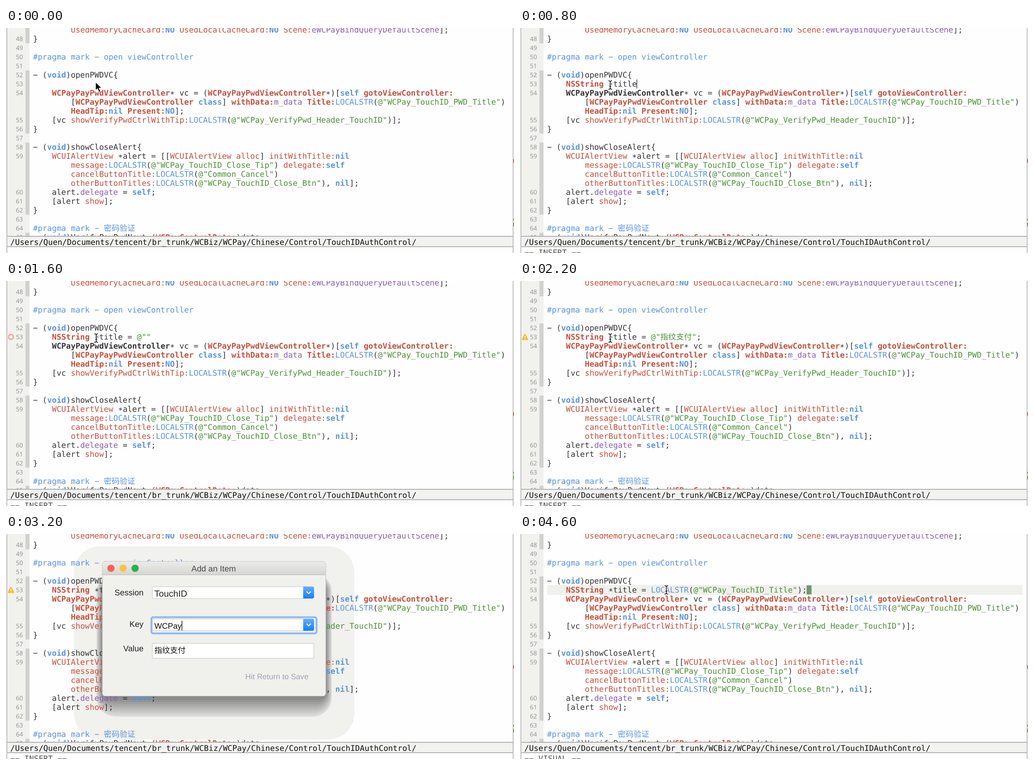
These frames come from a looping animation (1123 px wide and 499 px high, 4.8 s). An HTML page:

```html
<!DOCTYPE html>
<html lang="en">
<head>
<meta charset="utf-8">
<title>Editor with string dialog</title>
<style>
  html, body { margin: 0; width: 100%; height: 100%; overflow: hidden; background: #fefefe; }
  svg { display: block; width: 1123px; height: 499px; }
  text { white-space: pre; text-rendering: geometricPrecision; }
  .code { font: 17.35px "DejaVu Sans Mono", "Noto Sans CJK SC", "Noto Sans CJK", monospace; }
  .num { font: 13.6px "Open Sans", sans-serif; fill: #8e8e8e; text-anchor: end; }
  .ui { font-family: "Liberation Sans", "Noto Sans CJK SC", "Noto Sans CJK", sans-serif; }
  .k, .K { fill: #35353a; }
  .r, .R { fill: #c1513f; }
  .b, .B { fill: #5b94d8; }
  .g { fill: #4c9138; }
  .p { fill: #8a5fae; }
  .K, .R, .B { font-weight: bold; }
  .star { baseline-shift: -3px; }
</style>
</head>
<body>
<svg id="stage" viewBox="0 0 1123 499">
  <defs>
    <clipPath id="pane"><rect x="0" y="0" width="1120" height="461"/></clipPath>
    <linearGradient id="bar" x2="0" y2="1"><stop stop-color="#ebebe9"/><stop offset="1" stop-color="#d6d6d5"/></linearGradient>
    <linearGradient id="blue" x2="0" y2="1"><stop stop-color="#62b1f8"/><stop offset="1" stop-color="#1a7df3"/></linearGradient>
  </defs>
  <rect width="1123" height="499" fill="#fefefe"/>
  <g clip-path="url(#pane)">
    <rect x="3" width="49" height="461" fill="#f1f1ee"/>
    <g id="folds" fill="#d1d1d0"></g>
    <g id="shadow"></g>
    <rect id="rowLight" x="60" y="113" width="1051" height="22" fill="#f0f1ec"/>
    <g id="code"></g>
    <g id="edited"></g>
    <g id="declared"></g>
  </g>
  <rect id="caret" y="114" width="1.4" height="20" fill="#333"/>
  <rect id="block" x="633.5" y="114" width="11" height="20" fill="#6e976f"/>
  <circle id="error" cx="11" cy="124" r="5.2" fill="#fff" stroke="#eeaaa2" stroke-width="3.4"/>
  <g id="warning">
    <path d="M11 118 17 130H5Z" fill="#f5b92f" stroke="#f5b92f" stroke-width="2" stroke-linejoin="round"/>
    <path d="M11 121.5v4.5m0 1.6v1.8" stroke="#fff" stroke-width="1.8"/>
  </g>
  <rect x="3" y="462" width="1117" height="23" fill="#f2f2f0"/>
  <path d="M3 462H1121M3 485H1121" stroke="#9a9a9a" stroke-width="1.6"/>
  <path d="M2 0V499M1121 0V499" stroke="#b2b2b4" stroke-width="1.6"/>
  <path d="M1122 291v8" stroke="#d9695c" stroke-width="2"/>
  <path d="M1122 423v4m0 5v8" stroke="#78a957" stroke-width="2"/>
  <text class="code" x="9.5" y="480.5" fill="#111">/Users/Quen/Documents/tencent/br_trunk/WCBiz/WCPay/Chinese/Control/TouchIDAuthControl/</text>
  <text id="mode" class="code" x="9.5" y="504" fill="#555"></text>
  <g id="dialog" class="ui"></g>
  <path id="arrow" d="M198 120v18.5l4.3-4 3.4 7.8 3.4-1.5-3.4-7.5h6Z" fill="#000" stroke="#fff" stroke-width="1.2"/>
  <g id="beam" fill="none">
    <path d="M-4-9.5q4 0 4 3 0-3 4-3M0-6.5V6.5M-4 9.5q4 0 4-3 0 3 4 3M-2 3H2" stroke="#fff" stroke-width="3.5"/>
    <path d="M-4-9.5q4 0 4 3 0-3 4-3M0-6.5V6.5M-4 9.5q4 0 4-3 0 3 4 3M-2 3H2" stroke="#111" stroke-width="1.6"/>
  </g>
  <path id="cross" d="M198.5 115v17M190 124.5h17" stroke="#333" stroke-width="1.5"/>
</svg>
<script>
const LOOP = 4800, STEP = 200, COL = 10.445, LEFT = 59.7;
const $ = id => document.getElementById(id);
const show = (id, on) => $(id).setAttribute('display', on ? 'inline' : 'none');

// A backtick and a style letter open each coloured run.
function runs(line) {
  return line.split('`').slice(1).map(run => {
    const body = run.slice(1).replace(/\*/g, '<tspan class="star">*</tspan>');
    return `<tspan class="${run[0]}">${body}</tspan>`;
  }).join('');
}
const codeLine = (row, col, line) =>
  `<text class="code" x="${LEFT + col * COL}" y="${10 + row * 20}">${runs(line)}</text>`;

const lines = [
  [0, 8, '`rUsedMemoryCacheCard:`BNO`r UsedLocalCacheCard:`BNO`r Scene:`peWCPayBindQueryDefaultScene`k];'],
  [1, 0, '`k}'],
  [3, 0, '`b#pragma mark − open viewController'],
  [5, 0, '`k− (`Bvoid`k)openPWDVC{'],
  [8, 8, '`k[`RWCPayPayPwdViewController `Bclass`k] `RwithData:`pm_data`R Title:`bLOCALSTR`k(`g@"WCPay_TouchID_PWD_Title"`k)'],
  [9, 8, '`RHeadTip:`Bnil`R Present:`BNO`k];'],
  [10, 4, '`k[vc `rshowVerifyPwdCtrlWithTip:`bLOCALSTR`k(`g@"WCPay_VerifyPwd_Header_TouchID"`k)];'],
  [11, 0, '`k}'],
  [13, 0, '`k− (`Bvoid`k)showCloseAlert{'],
  [14, 4, '`rWCUIAlertView`k *alert = [[`rWCUIAlertView alloc`k] `rinitWithTitle:`Bnil'],
  [15, 8, '`rmessage:`bLOCALSTR`k(`g@"WCPay_TouchID_Close_Tip"`k) `rdelegate:`Bself'],
  [16, 8, '`rcancelButtonTitle:`bLOCALSTR`k(`g@"Common_Cancel"`k)'],
  [17, 8, '`rotherButtonTitles:`bLOCALSTR`k(`g@"WCPay_TouchID_Close_Btn"`k), `Bnil`k];'],
  [18, 4, '`kalert.`pdelegate`k = `Bself`k;'],
  [19, 4, '`k[alert `rshow`k];'],
  [20, 0, '`k}'],
  [22, 0, '`b#pragma mark − 密码验证'],
  [23, 0, '`k− (`Bvoid`k)VerifyPayPwdNext:(`RWCPayControlData`k*)data']
];

// Wrapped lines leave rows without a number.
const numberRow = n => n - 47 + (n > 54 ? 2 : 0) + (n > 59 ? 3 : 0);
let numbers = '';
for (let n = 48; n <= 65; n++) {
  numbers += `<text class="num" x="37.5" y="${9 + numberRow(n) * 20}">${n}</text>`;
}
$('code').innerHTML = numbers + lines.map(args => codeLine(...args)).join('');
$('folds').innerHTML = [[0, 34], [94, 234], [254, 414], [454, 461]]
  .map(([top, end]) => `<rect x="43" y="${top}" width="9" height="${end - top}"/>`).join('');

const box = (x, y, right, bottom, r, fill, more = '') =>
  `<rect x="${x}" y="${y}" width="${right - x}" height="${bottom - y}" rx="${r}" fill="${fill}" ${more}/>`;
const label = (x, y, size, fill, text, anchor = 'start') =>
  `<text x="${x}" y="${y}" font-size="${size}" fill="${fill}" text-anchor="${anchor}">${text}</text>`;

function shadow(active) {
  if (!active) {
    return box(165, 27, 753, 416, 46, '#f1f1ed') + box(214, 300, 706, 370, 26, '#d2d2d0');
  }
  let out = box(150, 27, 770, 456, 58, '#f1f1ed');
  const bands = 9;
  for (let i = 0; i < bands; i++) {
    const grey = 219 - i * 10;
    const side = 13 - i * 1.5;
    out += box(213 - side, 86 + i * 3, 707 + side, 405 - i * 4.6, 42 - i * 3, `rgb(${grey},${grey},${grey - 1})`);
  }
  return out;
}

function combo(y, active) {
  const border = 'stroke="#c5c5c5"';
  const button = active
    ? box(657, y, 681, y + 26.5, 4, 'url(#blue)') + box(657, y, 662, y + 26.5, 0, 'url(#blue)')
    : box(654, y + .5, 680.5, y + 26.5, 4, '#fff', border);
  return box(323.5, y + .5, 674, y + 26.5, 0, '#fff', border) + button +
    `<path d="M664.5 ${y + 11}l4.7 4.6 4.7-4.6" fill="none" stroke="${active ? '#fff' : '#333'}" stroke-width="2"/>`;
}

function dialog(active, key, caretOn) {
  const lights = active ? ['#fb6158', '#fdc43d', '#29b24b'] : ['#e6e6e4', '#e6e6e4', '#e6e6e4'];
  let out = box(213, 61, 707, 359.5, 6, '#f0f0ed', 'stroke="#b8b8b7"') +
    `<path d="M213.5 90V67q0-5.5 5.5-5.5H701q5.5 0 5.5 5.5V90Z" fill="${active ? 'url(#bar)' : '#fafafa'}"/>` +
    `<path d="M213 90.5H707" stroke="${active ? '#b9b9b8' : '#d8d8d7'}"/>`;
  lights.forEach((fill, i) => {
    out += `<circle cx="${232 + i * 26.7}" cy="76" r="8" fill="${fill}"/>`;
  });
  out += label(459, 83, 18.3, active ? '#4a4a4a' : '#b2b2b2', active ? 'Add an Item' : 'Window', 'middle');
  [['Session', 136], ['Key', 206], ['Value', 260]].forEach(([text, y]) => {
    out += label(304, y, 18, '#222', text, 'end');
  });
  if (active) out += box(321.5, 184.5, 686.5, 220.5, 4, '#f0f0ed', 'stroke="#8bbbf0" stroke-width="4"');
  out += combo(116.5, active) + combo(188, active) +
    box(323.5, 242.5, 680.5, 275.5, 0, '#fff', 'stroke="#c2c2c2"') +
    label(529, 322, 17.1, '#a2a2b8', 'Hit Return to Save');
  if (active) {
    out += label(328, 139, 19.8, '#222', 'TouchID') + label(328, 264, 17.3, '#111', '指纹支付') +
      `<text id="key" x="328" y="210" font-size="17.8" fill="#111">${key}</text>`;
    if (caretOn) out += '<rect id="keyCaret" y="192" width="1.4" height="22" fill="#111"/>';
  }
  return out;
}

const declaration = '`RNSString`k *title';
const typed = [
  '`k', '`k', '`kNSStr', '`RNSString`k *', declaration, declaration + ' =', declaration + ' = `g@',
  declaration + ' = `g@""', declaration + ' = `g@""', declaration + ' = `g@"指纹支付"',
  declaration + ' = `g@"指纹支付"`k;'
];
const saved = declaration + ' = `bLOCALSTR`k(`g@"WCPay_TouchID_Title"`k);';
const keys = ['', 'WC', 'WCPay', 'WCPay_TouchID', 'WCPay_TouchID_Title', 'WCPay_TouchID_Title'];

let drawn = -1;
function draw(time) {
  const step = Math.floor((time % LOOP) / STEP);
  if (step === drawn) return;
  drawn = step;

  const line = step >= 20 ? saved : typed[Math.min(step, typed.length - 1)];
  const broken = step >= 2 && step <= 9;
  $('edited').innerHTML = codeLine(6, 4, line);
  $('declared').innerHTML = codeLine(7, 4, '`' + (broken ? 'K' : 'R') +
    'WCPayPayPwdViewController`k* vc = (`RWCPayPayPwdViewController`k*)[`Bself`R gotoViewController:');

  show('caret', step >= 1 && step <= 6);
  $('caret').setAttribute('x', LEFT + (4 + line.replace(/`./g, '').length) * COL - .5);
  show('error', step >= 7 && step <= 9);
  show('warning', step >= 11 && step <= 19);
  show('rowLight', step >= 22);
  show('block', step >= 22);
  $('mode').textContent = step === 23 ? '−− VISUAL −−' : step >= 1 && step <= 21 ? '−− INSERT −−' : '';

  const open = step >= 13 && step <= 19, active = step >= 14;
  $('shadow').innerHTML = open ? shadow(active) : '';
  $('dialog').innerHTML = open ? dialog(active, keys[step - 14], step < 19) : '';
  const keyCaret = $('keyCaret');
  if (keyCaret) keyCaret.setAttribute('x', 328 + $('key').getComputedTextLength());

  show('arrow', step === 0);
  show('beam', (step >= 1 && step <= 12) || step >= 22);
  $('beam').setAttribute('transform', step >= 22 ? 'translate(323.5 124)' : 'translate(199.5 126.5)');
  show('cross', step === 13);
}

const start = performance.now();
function tick() {
  draw(performance.now() - start);
  requestAnimationFrame(tick);
}
tick();
</script>
</body>
</html>
```
